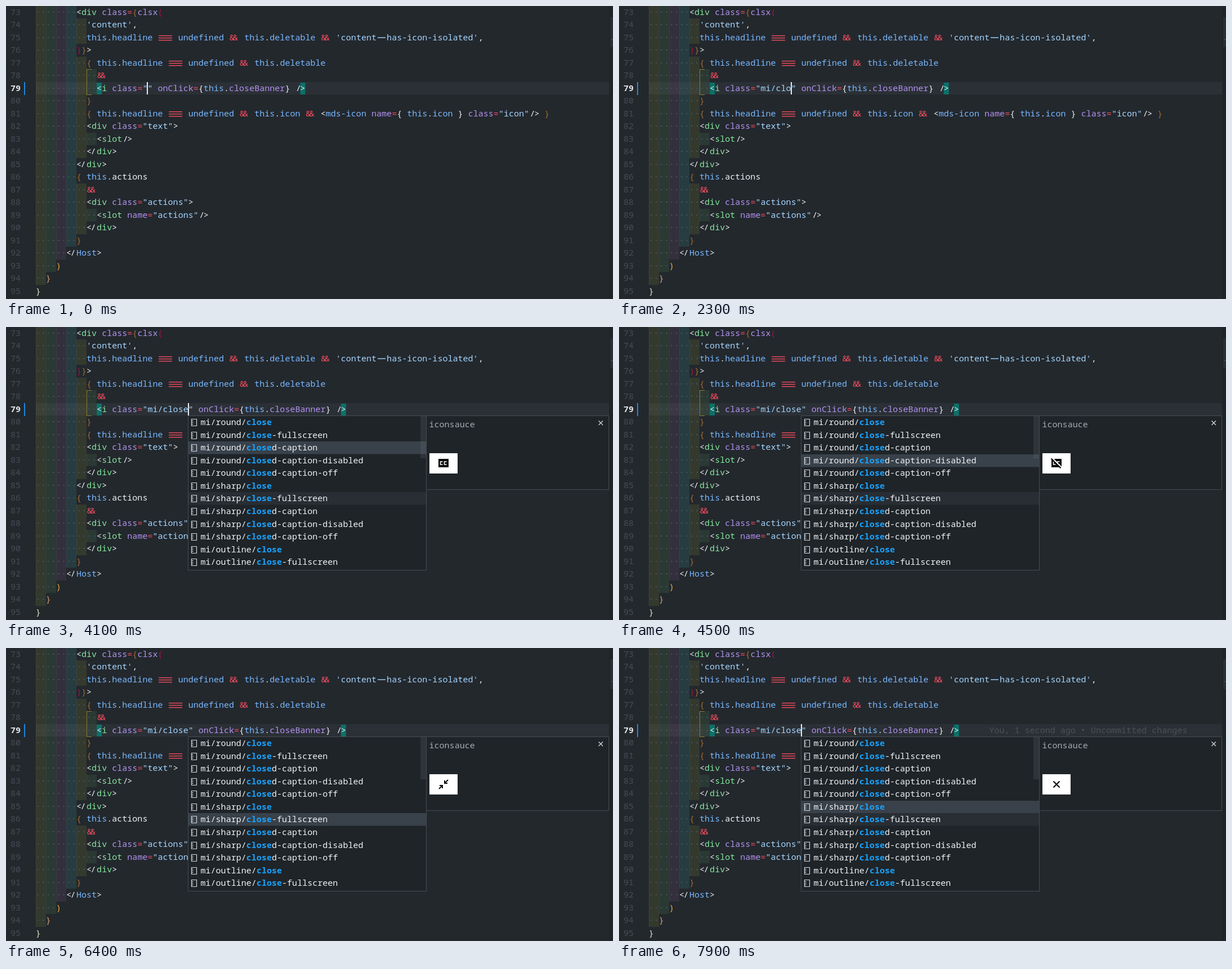
An HTML page with a canvas for the animation above (8 s loop, 1078 by 520 pixels).

```html
<!DOCTYPE html>
<html lang="en">
<head>
<meta charset="utf-8">
<title>Icon completion in a code editor</title>
<style>
  html, body { margin: 0; width: 100%; height: 100%; overflow: hidden; background: #23282d; }
  canvas { display: block; }
</style>
</head>
<body>
<canvas id="stage" width="1078" height="520"></canvas>
<script>
const ctx = document.getElementById('stage').getContext('2d');
const LOOP = 8000, CHAR = 9.035, ROW = 22.5, LEFT = 52.7, FIRST = 73, ACTIVE = 79;
const FAMILY = '15.06px "Noto Sans Mono", "DejaVu Sans Mono", monospace';
const REGULAR = '500 ' + FAMILY, BOLD = 'bold ' + FAMILY;
const PANEL = '#1f2428', BORDER = '#454c53';

// One letter after ~ switches the text colour.
const COLORS = {
  w: '#f0f3f6', g: '#85e89d', p: '#b392f0', r: '#f14c5e', b: '#79b8ff', s: '#a5d6ff',
  o: '#a56a2c', c: '#a8124a', y: '#f0a93c', t: '#d6a276', k: '#e6e6c4', d: '#4a5157'
};
const INDENT_TINTS = ['rgba(255,255,64,.08)', 'rgba(127,255,127,.08)', 'rgba(255,127,255,.08)', 'rgba(79,236,236,.1)'];

const undefinedCheck = '~bthis~w.~bheadline ~r=== ~bundefined ~r&& ~bthis~w.~b';
const lines = [
  '        ~w<~gdiv ~pclass~r=~o{~pclsx~c(',
  "          ~s'content'~w,",
  '          ' + undefinedCheck + "deletable ~r&& ~s'content--has-icon-isolated'~w,",
  '        ~c)~o}~w>',
  '          ~o{ ' + undefinedCheck + 'deletable',
  '            ~r&&',
  '',
  '          ~o}',
  '          ~o{ ' + undefinedCheck + 'icon ~r&& ~w<~bmds-icon ~pname~r=~w{ ~bthis~w.~bicon ~w} ~pclass~r=~s"icon"~w/> ~o}',
  '          ~w<~gdiv ~pclass~r=~s"text"~w>',
  '            ~w<~gslot~w/>',
  '          ~w</~gdiv~w>',
  '        ~w</~gdiv~w>',
  '        ~o{ ~bthis~w.actions',
  '          ~r&&',
  '          ~w<~gdiv ~pclass~r=~s"actions"~w>',
  '            ~w<~gslot ~pname~r=~s"actions"~w/>',
  '          ~w</~gdiv~w>',
  '        ~o}',
  '      ~w</~bHost~w>',
  '    ~y)',
  '  ~t}',
  '~k}'
];
const activeLine = typed => `            ~w<~gi ~pclass~r=~s"${typed}" ~ponClick~r=~w{~bthis~w.~pcloseBanner~w} />`;

const suffixes = ['', '-fullscreen', 'd-caption', 'd-caption-disabled', 'd-caption-off'];
const options = ['round', 'sharp', 'outline']
  .flatMap(style => suffixes.map(suffix => ['mi/' + style + '/', suffix])).slice(0, 12);

// Each entry is [start time, value].
const TYPED = [[0, ''], [900, 'm'], [1100, 'mi'], [1600, 'mi/'], [1800, 'mi/c'], [2000, 'mi/cl'],
  [2200, 'mi/clo'], [2350, 'mi/clos'], [2500, 'mi/close']];
const SELECTED = [[0, 0], [3700, 1], [4100, 2], [4500, 3], [4900, 4], [5300, 5], [6200, 6],
  [6800, 7], [7600, 6], [7800, 5]];
const BLAME = [[0, ''], [1300, 'You, now'], [1600, ''], [7700, 'You, 1 second ago']];
const POPUP_AT = 2700;
const valueAt = (track, t) => track.filter(([start]) => start <= t).pop()[1];
const rowTop = index => Math.round(index * ROW - .4);

function caretVisible(t) {
  if (t < 900) return t < 500;
  return t < 3400 || (t - 3400) % 1000 >= 500;
}

function rect(x, y, w, h, color) {
  ctx.fillStyle = color;
  ctx.fillRect(x, y, w, h);
}

function frame(x, y, w, h) {
  rect(x, y, w, h, PANEL);
  ctx.strokeStyle = BORDER;
  ctx.lineWidth = 1;
  ctx.strokeRect(x + .5, y + .5, w - 1, h - 1);
}

function text(string, x, y, color, font = REGULAR) {
  ctx.font = font;
  ctx.fillStyle = color;
  ctx.fillText(string, x, y);
}

function stroke(path, color, width) {
  ctx.strokeStyle = color;
  ctx.lineWidth = width;
  ctx.stroke(new Path2D(path));
}

// Draws one run of code, joining operators the way a ligature font does.
function run(string, x, y, color) {
  for (const part of string.split(/(===|&&|<\/|\/>|--)/)) {
    const [a, b] = part;
    if (part === '===') {
      for (const dy of [-9, -5, -1]) rect(x + 1.5, y + dy, 24, 1.4, color);
    } else if (part === '--') {
      rect(x + 2, y - 5.5, 14, 1.4, color);
    } else if (part === '&&') {
      text(a, x + .8, y, color);
      text(b, x + 7, y, color);
    } else if (part === '</' || part === '/>') {
      text(a, x + (a === '/' ? 1.5 : 0), y, color);
      text(b, x + CHAR - (b === '/' ? 1.5 : 0), y, color);
    } else {
      text(part, x, y, color);
    }
    x += part.length * CHAR;
  }
}

function codeLine(source, index) {
  const top = rowTop(index), height = rowTop(index + 1) - top, indent = source.search(/[^ ]/);
  for (let col = 0; col < indent; col += 2) {
    const x = 53 + col * 9;
    rect(x, top, 18, height, INDENT_TINTS[col / 2 % 4]);
    rect(x, top, 1, height, 'rgba(255,255,255,.05)');
  }
  for (let col = 0; col < indent; col++)
    rect(LEFT + (col + .5) * CHAR - 1, top + 10, 2, 2, '#4b545c');
  let x = LEFT + indent * CHAR;
  for (const part of source.trim().split('~').slice(1)) {
    run(part.slice(1), x, top + 16, COLORS[part[0]]);
    x += (part.length - 1) * CHAR;
  }
}

function editor(t) {
  const typed = valueAt(TYPED, t), row = ACTIVE - FIRST, top = rowTop(row);
  rect(0, 0, 1078, 520, '#23282d');
  rect(53, top, 1018, 22, '#2b3036');
  rect(32, top, 2, 23, '#1f86e0');

  const source = activeLine(typed);
  const end = LEFT + source.replace(/~./g, '').length * CHAR;
  for (const x of [LEFT + 12 * CHAR, end - CHAR]) rect(x, top + 1, CHAR, 21, '#0d7169');

  lines.forEach((line, i) => {
    const active = i === row;
    codeLine(active ? source : line, i);
    text(FIRST + i, 8, rowTop(i) + 16, active ? '#e1e4e8' : '#444d56', active ? '600 ' + FAMILY : REGULAR);
  });
  stroke('M152 112.5H143.5V157.5H152', '#8f7d2c', 1);

  const blame = valueAt(BLAME, t);
  if (blame) text(blame + ' • Uncommitted changes', end + 6 * CHAR - .7, top + 16, COLORS.d);
  if (caretVisible(t)) rect(Math.round(LEFT + (22 + typed.length) * CHAR - 1), top, 2, 22, '#e8eef2');

  rect(1071, 0, 7, 520, '#1f2428');
  rect(1073, 20, 5, 53, '#293036');
  rect(1075, 59, 3, 1, '#3c6b55');
}

function previewIcon(kind) {
  const black = '#0b0b0b', white = '#fff';
  if (kind === 0) return stroke('M771.5 236.5l11 11m0-11l-11 11', black, 2.2);
  if (kind === 1) return stroke('M785 234l-6 6m0-5v5h5M769 250l6-6m0 5v-5h-5', black, 2);
  if (kind === 4) stroke('M769 235h16v13h-16z', black, 2);
  else rect(768, 234, 18, 15, black);
  const letter = 'h-4v5h4';
  stroke(`M775.5 239${letter}M782.5 239${letter}`, kind === 4 ? black : white, 1.5);
  if (kind === 3) {
    stroke('M769 232l17 17', white, 2);
    stroke('M767.5 233.5l17 17', black, 2);
  }
}

function popup(t) {
  const selected = valueAt(SELECTED, t);
  frame(323, 157, 424, 275);
  options.forEach(([prefix, suffix], i) => {
    const top = Math.round(158 + i * 22.57), base = top + 16;
    if (i === selected) rect(324, top, 422, 22.5, '#39414a');
    else if (i === 6) rect(324, top, 422, 22.5, '#282e33');
    stroke(`M329.5 ${top + 5.5}h9v12h-9zm0 3h3m-3 3h3m-3 3h3`, '#d4d8dc', 1.2);
    text(prefix, 345.5, base, COLORS.w);
    const x = 345.5 + prefix.length * CHAR;
    text('close', x, base, '#18a3ff', BOLD);
    text(suffix, x + 5 * CHAR, base, COLORS.w);
  });
  rect(736, 158, 10, 75, 'rgba(106,115,125,.2)');

  frame(746, 157, 325, 132);
  text('iconsauce', 751.5, 178, '#a5acb3');
  stroke('M1052.5 166.5l7.5 7.5m0-7.5l-7.5 7.5', '#d8dce0', 1.2);
  rect(752, 224, 50, 36, '#fff');
  previewIcon(selected % 5);
}

function draw() {
  const t = performance.now() % LOOP;
  editor(t);
  if (t >= POPUP_AT) popup(t);
  requestAnimationFrame(draw);
}
draw();
</script>
</body>
</html>
```
